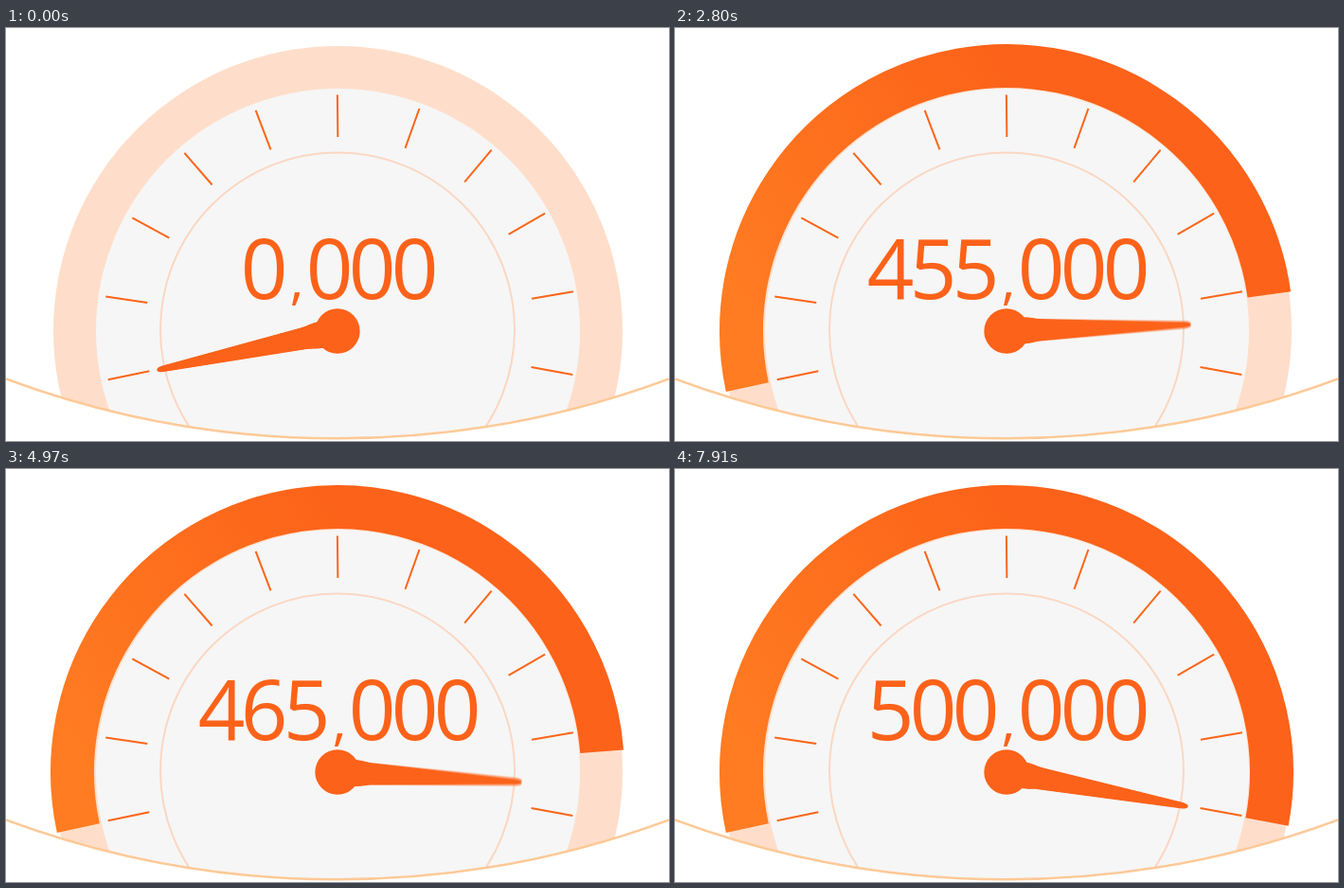
An HTML page with a canvas for the animation above (8.68 s loop, 700 by 436 pixels).

```html
<!DOCTYPE html>
<html lang="en">
<head>
<meta charset="utf-8">
<title>Gauge</title>
<style>
  html, body { margin: 0; width: 100%; height: 100%; overflow: hidden; background: #fff; }
  svg, canvas { position: absolute; left: 0; top: 0; width: 700px; height: 436px; }
  text { font: 400 87px "Open Sans", "Noto Sans", sans-serif; fill: #fc6219; text-anchor: middle; }
  .comma { font-size: 56px; }
</style>
</head>
<body>
<svg viewBox="0 0 700 436">
  <defs>
    <clipPath id="bowl"><path d="M0 0V370.300A1005 1005 0 0 0 700 370.300V0Z"/></clipPath>
    <linearGradient id="heat" gradientUnits="userSpaceOnUse" x1="70" y1="300" x2="390" y2="90">
      <stop offset="0" stop-color="#ff7c22"/>
      <stop offset="1" stop-color="#fc6219"/>
    </linearGradient>
  </defs>
  <g clip-path="url(#bowl)" fill="none">
    <circle cx="350.5" cy="319.5" r="300.5" fill="#fedeca"/>
    <circle cx="350.5" cy="319.5" r="255.5" fill="#f6f6f6"/>
    <circle cx="350" cy="318.5" r="187" stroke="#fad7c3" stroke-width="2"/>
    <path id="arc" stroke="url(#heat)" stroke-width="46"/>
    <path id="marks" stroke="#fc6519" stroke-width="2"/>
  </g>
  <path d="M0 370.300A1005 1005 0 0 0 700 370.300" fill="none" stroke="#fdc996" stroke-width="2.500"/>
  <text id="count" y="285.500"></text>
</svg>
<canvas id="hand" width="700" height="436"></canvas>
<script>
const LOOP = 8680, STEP = 70, END = 7910;
const CX = 350, CY = 320, R = 280;
const LOW = -102.2, HIGH = 100.8, MAX = 500000;
const ORANGE = '#fc6219';
const byId = id => document.getElementById(id);
const arc = byId('arc'), count = byId('count'), ctx = byId('hand').getContext('2d');
const hand = new Path2D('M-14 -14C-14 -28 -12 -28 -11.500 -38L-3.200 -189Q-2.500 -195 0 -195Q2.500 -195 3.200 -189L11.500 -38C12 -28 14 -28 14 -14Z');

// Turning points of the swing: [ms, degrees clockwise from the top].
const turns = [[0, LOW], [630, HIGH], [1680, -76], [1700, -76], [2166, HIGH], [2435, HIGH],
  [3640, 15.5], [4750, HIGH], [5460, 34], [5845, 85], [6370, 34], [6860, 90], [7280, 34], [END, HIGH]];

function level(t) {
  t = Math.min(Math.max(t, 0), END);
  const i = Math.max(1, turns.findIndex(k => k[0] >= t));
  const [t0, a] = turns[i - 1], [t1, b] = turns[i];
  const u = (t - t0) / (t1 - t0);
  return a + (b - a) * u * u * (3 - 2 * u);
}

// The hand follows a rise at once but drops a step late.
const handAngle = t => Math.max(level(t - 10), level(t - STEP));

function point(deg, r, cx = CX, cy = CY) {
  const a = deg * Math.PI / 180;
  return `${cx + r * Math.sin(a)} ${cy - r * Math.cos(a)}`;
}

function drawMarks() {
  let d = '';
  for (let i = 0; i <= 10; i++) {
    const a = -101.7 + 20.22 * i;
    d += `M${point(a, 205.5, 352.5, 320.5)}L${point(a, 250, 352.5, 320.5)}`;
  }
  byId('marks').setAttribute('d', d);
}

function drawArc(t) {
  const a = level(t), span = a - LOW;
  arc.setAttribute('d', span < 0.1 ? '' :
    `M${point(LOW, R)}A${R} ${R} 0 ${span > 180 ? 1 : 0} 1 ${point(a, R)}`);
}

// The number trails the arc at first, then catches up; slow moves show round steps.
function drawCount(t) {
  const lag = 54 * Math.max(0, 1 - (t / 2800) ** 3);
  const fast = Math.abs(level(t) - level(t - STEP)) > 25;
  const unit = fast ? 1 : 5000;
  const n = Math.ceil((level(t - lag) - LOW) / (HIGH - LOW) * MAX / unit - 0.01) * unit;
  const s = String(n).padStart(4, '0').replace(/(\d{3})$/, ',$1');
  const wide = c => c === ',' ? 24 : 45;
  const chars = [...s];
  let x = 352 - chars.reduce((sum, c) => sum + wide(c), 0) / 2;
  const xs = chars.map(c => (x += wide(c)) - wide(c) / 2);
  count.setAttribute('x', xs.join(' '));
  count.innerHTML = s.replace(',', '<tspan class="comma">,</tspan>');
}

// Averages the hand over a short shutter for motion blur.
function drawHand(t) {
  const n = 17, shutter = 14;
  ctx.clearRect(0, 0, 700, 436);
  ctx.globalCompositeOperation = 'lighter';
  ctx.globalAlpha = 1 / (n - 2);
  for (let i = 0; i < n; i++) {
    ctx.save();
    ctx.translate(CX, CY);
    ctx.rotate(handAngle(t + (i / (n - 1) - 0.5) * shutter) * Math.PI / 180);
    ctx.fill(hand);
    ctx.restore();
  }
  ctx.globalAlpha = 1;
  ctx.globalCompositeOperation = 'source-in';
  ctx.fillRect(0, 0, 700, 436);
  ctx.globalCompositeOperation = 'source-over';
  ctx.beginPath();
  ctx.arc(CX, CY, 23.7, 0, 2 * Math.PI);
  ctx.fill();
}

let shown = -1;
function tick() {
  const t = Math.min(Math.floor(performance.now() % LOOP / STEP) * STEP, END);
  if (t !== shown) {
    shown = t;
    drawArc(t);
    drawCount(t);
    drawHand(t);
  }
  requestAnimationFrame(tick);
}
ctx.fillStyle = ORANGE;
drawMarks();
tick();
</script>
</body>
</html>
```
